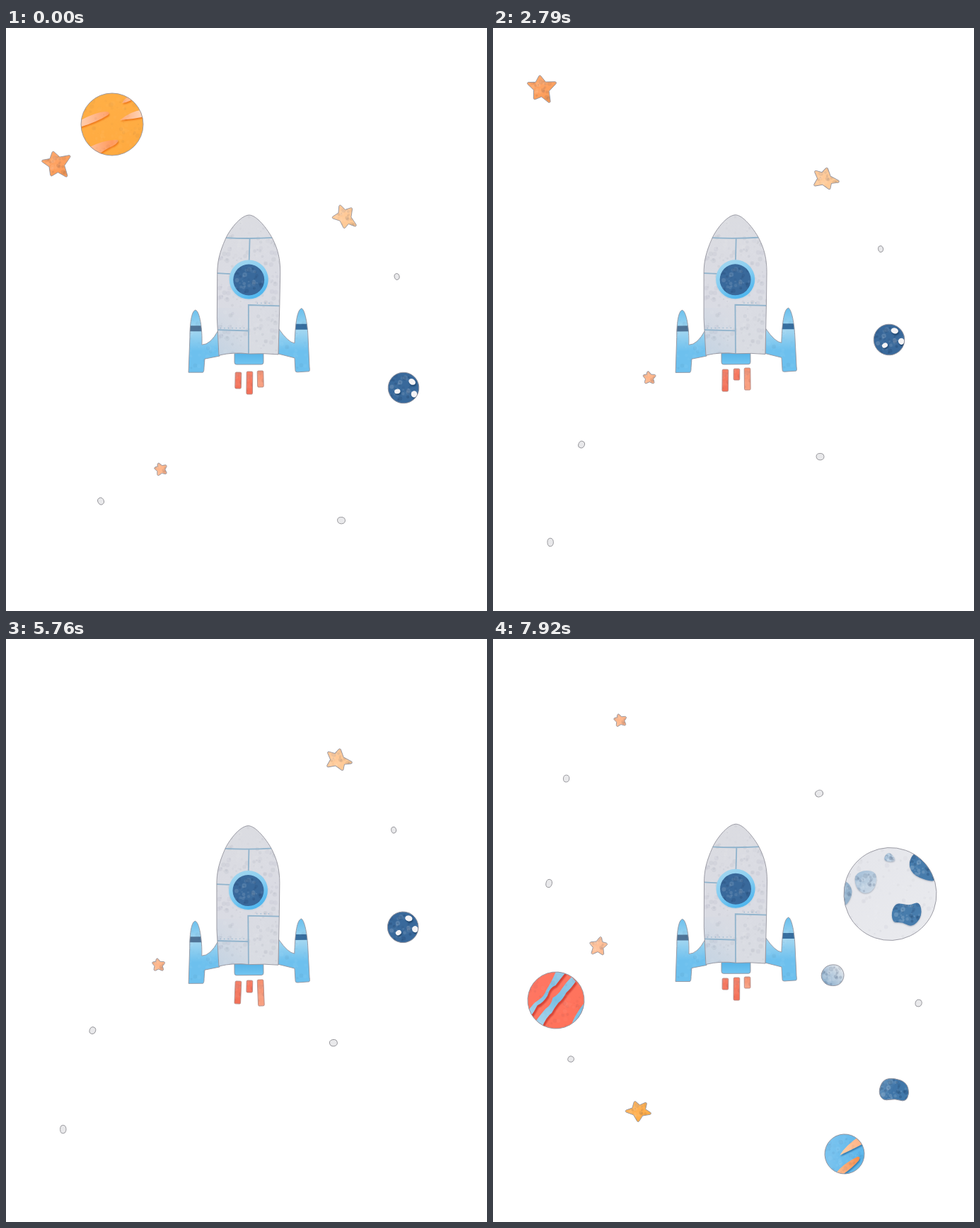
An HTML page with a canvas that plays this animation: 680 by 823 pixels, repeating every 8 s.

```html
<!DOCTYPE html>
<html lang="en">
<head>
<meta charset="utf-8">
<title>Paper rocket</title>
<style>
  html, body { margin: 0; width: 100%; height: 100%; overflow: hidden; background: #fff; }
  canvas { display: block; width: 100vw; height: 100vh; }
</style>
</head>
<body>
<canvas width="680" height="823"></canvas>
<script>
const ctx = document.querySelector('canvas').getContext('2d');
const STEP = 90, CYCLE = 3060, LOOP = 8000;
const DRIFT = 0.47, TOP = 64, BOTTOM = 760;
const TIMES = [0, 450, 810, 1440, 1800, 1980, 2790];
const OUTLINE = '#94949e', DEEP = '#39699b', SKY = '#6dc0ee';

// ---------- drawing helpers ----------
function wash(x0, y0, x1, y1, ...colors) {
  const g = ctx.createLinearGradient(x0, y0, x1, y1);
  colors.forEach((c, i) => g.addColorStop(i / (colors.length - 1), c));
  return g;
}

function disc(r, x = 0, y = 0, ry = r, turn = 0) {
  const p = new Path2D();
  p.ellipse(x, y, r, ry, turn, 0, 7);
  return p;
}

// Smooth closed outline through the midpoints of a polygon
function pebblePath(points) {
  const p = new Path2D(), n = points.length;
  const mid = i => {
    const [a, b] = points[i % n], [c, d] = points[(i + 1) % n];
    return [(a + c) / 2, (b + d) / 2];
  };
  p.moveTo(...mid(0));
  for (let i = 1; i <= n; i++) p.quadraticCurveTo(...points[i % n], ...mid(i));
  p.closePath();
  return p;
}

// Star with slightly blunt tips; valleys sit between neighbouring tips
function starPath(tips) {
  const p = new Path2D(), points = [];
  tips.forEach(([x, y], i) => {
    const [nx, ny] = tips[(i + 1) % 5];
    points.push([x, y], [(x + nx) * 0.31, (y + ny) * 0.31]);
  });
  const last = points[9];
  p.moveTo(last[0], last[1]);
  points.forEach(([x, y], i) => {
    if (i % 2) p.lineTo(x, y);
    else p.arcTo(x, y, ...points[i + 1], 1.7);
  });
  p.closePath();
  return p;
}

// Seeded watercolour grain inside a box of half size r
function grain(r, strength, x = 0, y = 0) {
  let seed = 7;
  const random = () => (seed = seed * 16807 % 2147483647) / 2147483647;
  for (let i = 0; i < 4 + r * 3; i++) {
    ctx.fillStyle = `rgba(${i % 2 ? '255,255,255' : '0,25,60'},${strength * random()})`;
    ctx.fill(disc(1 + random() * 2.5, x + (random() * 2 - 1) * r, y + (random() * 2 - 1) * r));
  }
}

function cutout(path, fill, inside, line = OUTLINE) {
  ctx.fillStyle = fill;
  ctx.fill(path);
  if (inside) {
    ctx.save();
    ctx.clip(path);
    inside();
    ctx.restore();
  }
  if (line) {
    ctx.strokeStyle = line;
    ctx.lineWidth = 0.9;
    ctx.stroke(path);
  }
}

function raised(path, fill, shadow, dx = 1, dy = 2) {
  ctx.save();
  ctx.shadowColor = shadow;
  ctx.shadowBlur = 2;
  ctx.shadowOffsetX = dx;
  ctx.shadowOffsetY = dy;
  ctx.fillStyle = fill;
  ctx.fill(path);
  ctx.restore();
}

// ---------- things in space ----------
const star = (tips, light, dark) => () =>
  cutout(starPath(tips), wash(-10, -12, 8, 14, light, dark), () => grain(14, 0.09));

function orangePlanet() {
  cutout(disc(44), wash(-10, -44, 10, 44, '#ffaf46', '#ffaa40'), () => {
    const band = wash(-40, 0, 40, 0, '#ffc9a8', '#ff9a5c', '#ffd2b4');
    const shade = '#f07c1c';
    for (const d of [
      'M-46 -5Q-22 -18 -8 -18Q-2 -17 -6 -13Q-22 -3 -46 4Z',
      'M11 -6Q26 -19 46 -21L46 -11Q28 -7 11 -6Z',
      'M-34 33Q-10 21 8 22Q10 25 2 30Q-12 36 -20 44Z',
      'M14 -30Q17 -36 24 -40L27 -34Q21 -31 14 -30Z'
    ]) raised(new Path2D(d), band, shade);
    grain(44, 0.04);
  });
}

function redPlanet() {
  cutout(disc(40), wash(-20, -30, 25, 35, '#ff7662', '#ff725a'), () => {
    const stripe = wash(-30, 30, 25, -35, '#a9d5ec', '#79bfe4', '#9acbe4');
    for (const d of [
      'M-43 13Q-34 1 -25 -3Q-16 -7 -11 -17Q-4 -25 6 -42L19 -38Q8 -27 2 -21Q-7 -19 -11 -8Q-18 1 -27 4Q-32 12 -40 20Z',
      'M-36 30Q-24 17 -16 10Q-8 7 -4 -4Q5 -8 10 -15Q17 -23 26 -30L31 -23Q23 -14 16 -9Q9 1 3 4Q-4 11 -8 17Q-17 22 -25 37Z',
      'M17 38Q24 23 42 6L42 40Z'
    ]) raised(new Path2D(d), stripe, '#d64537', 2, 3);
    grain(40, 0.05);
  });
}

function bluePlanet() {
  cutout(disc(28), wash(-20, -5, 25, 12, '#79c3ef', '#5bb5ea'), () => {
    raised(new Path2D('M-7 0Q4 -11 28 -20L30 -8Q10 -3 -7 0Z'), wash(-7, 0, 28, 0, '#ffd0a8', '#ffb183'), '#347fb5');
    raised(new Path2D('M-24 29Q-12 14 17 8Q22 9 17 14Q4 23 -14 29Z'), wash(-20, 20, 20, 10, '#ffc198', '#f78c48'), '#347fb5');
    grain(28, 0.06);
  });
}

function navyPlanet() {
  cutout(disc(21.8), DEEP, () => {
    grain(22, 0.16);
    raised(disc(5.2, 11, -10, 4, 0.5), '#f4f3f5', '#1d4670');
    raised(disc(4.2, -8, 6, 3.3, -0.3), '#f4f3f5', '#1d4670');
    raised(disc(4.3, 16, 7, 4.6), '#f4f3f5', '#1d4670');
  });
}

function moon() {
  cutout(disc(65.5), wash(-40, -50, 40, 60, '#e5e6eb', '#e9eaee'), () => {
    grain(65, 0.04);
    const patch = (points, fill, r, x, y, strength) => {
      raised(pebblePath(points), fill, '#aab0bc', 0, 1);
      ctx.save();
      ctx.clip(pebblePath(points));
      grain(r, strength, x, y);
      ctx.restore();
    };
    const pale = wash(-50, -35, -20, 0, '#9fbcd6', '#d3dde8');
    patch([[-50, -30], [-33, -36], [-17, -31], [-20, -10], [-33, -1], [-47, -8]], pale, 15, -33, -18, 0.15);
    patch([[-72, -24], [-58, -20], [-52, -5], [-62, 13], [-72, 12]], '#94b2cc', 12, -62, -5, 0.12);
    patch([[-8, -49], [1, -61], [12, -47], [2, -45]], wash(-7, -55, 8, -45, '#7fa6ca', '#dce6ef'), 8, 1, -52, 0.15);
    patch([[28, -44], [40, -60], [65, -42], [68, -15], [52, -16], [32, -27]], '#477cac', 20, 48, -36, 0.18);
    patch([[0, 26], [8, 12], [26, 18], [41, 12], [44, 33], [29, 49], [14, 40], [2, 41]], '#477cac', 20, 22, 29, 0.18);
  });
}

function darkRock() {
  const edge = [[-21, -5], [-9, -20], [7, -17], [21, -6], [21, 10], [11, 20], [-1, 11], [-18, 9]];
  cutout(pebblePath(edge), wash(-18, -15, 14, 15, '#6d9ac0', '#3e74a7', '#427aac'), () => grain(20, 0.17));
}

function lightRock() {
  const edge = [[-18, -2], [-7, -16], [12, -14], [18, 2], [8, 16], [-11, 13]];
  cutout(pebblePath(edge), wash(-12, 10, 13, -8, '#8caecb', '#b5cadd', '#dfe5eb'), () => grain(15, 0.15));
}

const pebble = (w, h) => () => cutout(
  pebblePath([[-w, 0], [-w * 0.6, -h], [w * 0.7, -h], [w * 1.1, 0], [w * 0.6, h], [-w * 0.7, h]]),
  '#e9e9eb', null, '#949499');

// Each path starts at TIMES[start] and holds [x, y, degrees] for that and the following times
const bodies = [
  { draw: orangePlanet, r: 44, start: 0, path: [[150, 136, 0], [159, 302, -5], [171, 442, -12]] },
  { draw: redPlanet, r: 40, start: 3, path: [[86, 392, 0], [89, 510, -7], [86, 571, -17]] },
  { draw: bluePlanet, r: 28, start: 1, path: [[510, 105, 0], [506, 264, 2], [502, 571, 12], [497, 727, -14]] },
  { draw: navyPlanet, r: 22, start: 5, path: [[570.5, 141.5, 0], [560, 440, -16], [562, 508, 7], [557, 650, -18]] },
  { draw: moon, r: 65.5, start: 3, path: [[569, 225, 0], [561.5, 360, -3], [557, 429, -6]] },
  { draw: darkRock, r: 18, start: 2, path: [[587, 137, 24], [585.5, 504, 0], [566, 638, -18], [556, 724, -32]] },
  { draw: lightRock, r: 15, start: 3, path: [[475.5, 324, 0], [480, 475, -8], [476.5, 555, -14]] },
  { draw: star([[-4, -19], [23, -13], [18, 20], [-7, 18], [-22, -5]], '#ffa76a', '#fc9c58'), r: 19, start: 6,
    path: [[67, 85, 9], [70, 192, 0], [78, 397, -12], [81, 559, -24]] },
  { draw: star([[-7, -18], [12, -13], [20, 16], [0, 18], [-19, 2]], '#ffc999', '#ffca96'), r: 18, start: 6,
    path: [[468, 213, -28], [478, 266, 0], [480, 438, -18], [476, 555, 26]] },
  { draw: star([[-4, -16], [14, -13], [21, 5], [-1, 16], [-21, -2]], '#ffb45e', '#ffab43'), r: 16, start: 1,
    path: [[202, 90, 18], [201, 229, 6], [202, 517, 0], [205, 667, -4], [211, 737, -5]] },
  { draw: star([[3, -15], [14, -4], [9, 14], [-10, 14], [-14, -4]], '#ffc6a0', '#ffbb92'), r: 14, start: 3,
    path: [[147, 288, 0], [149, 433, 4], [152, 499, 2]] },
  { draw: star([[-4, -11], [10, -6], [9, 8], [-6, 10], [-11, -3]], '#ffbd93', '#ffb184'), r: 10, start: 4,
    path: [[180, 115, 0], [172, 191, 4], [221, 494, 8], [219, 623, -4]] },
  { draw: pebble(5, 5.5), r: 6, start: 3,
    path: [[471, 90, 0], [461, 218, 60], [466, 290, 20], [462.5, 605, 85], [474, 695, 85]] },
  { draw: pebble(4.5, 5.8), r: 6, start: 3, path: [[78.5, 202, 10], [79, 345, 10], [77.5, 421, 0], [81, 726, -5]] },
  { draw: pebble(4.5, 4.2), r: 5, start: 2, path: [[108.5, 162, 0], [107.5, 464, 0], [110, 593, 20], [111.5, 667, 10]] },
  { draw: pebble(4.5, 5), r: 5, start: 4, path: [[103.5, 197, 0], [100.5, 269, 0], [125, 588, 20], [134, 668, -35]] },
  { draw: pebble(3.7, 4.4), r: 5, start: 6, path: [[548, 312, -15], [552.5, 351, -20], [548, 467, -90], [545.5, 600, 10]] },
  { draw: pebble(4.8, 5), r: 5, start: 2, path: [[616, 50, 0], [610.5, 388, 30], [601.5, 514, 10], [588.5, 597, 15]] }
];

function poseAt(body, phase) {
  const { start, path } = body;
  const keys = path.map((_, i) => TIMES[(start + i) % 7] + (start + i >= 7 ? CYCLE : 0));
  const from = keys[0] - 750, last = path.length - 1;
  const t = from + ((phase - from) % CYCLE + CYCLE) % CYCLE;
  const beyond = (i) => [path[i][0], path[i][1] + (t - keys[i]) * DRIFT, path[i][2]];
  if (t <= keys[0]) return beyond(0);
  if (t >= keys[last]) return beyond(last);
  const i = keys.findIndex(k => k > t) - 1;
  const mix = (t - keys[i]) / (keys[i + 1] - keys[i]);
  return path[i].map((v, j) => v + (path[i + 1][j] - v) * mix);
}

function drawBody(body, phase) {
  const [x, y, angle] = poseAt(body, phase);
  if (y - body.r < TOP || y + body.r > BOTTOM) return;
  ctx.save();
  ctx.translate(x, y);
  ctx.rotate(angle * Math.PI / 180);
  body.draw();
  ctx.restore();
}

// ---------- rocket ----------
function drawRocket(phase) {
  const turn = phase / CYCLE * 2 * Math.PI;
  ctx.save();
  ctx.translate(344, 470 - 1.5 + 1.5 * Math.cos(turn));
  ctx.rotate(0.011 * Math.sin(turn - 0.2));
  ctx.translate(-344, -470);

  const fin = (d, x, bandY, band) => cutout(new Path2D(d), wash(0, 396, 0, 486, '#68bfed', '#a4d7f1', SKY, SKY), () => {
    ctx.fillStyle = band;
    ctx.fillRect(x, bandY, 26, 8);
    grain(44, 0.05, x + 18, 445);
  });
  fin('M268 398C262 399 260 420 260 436L258 486H278Q280 486 280 479L281 467L302 463L300 427Q289 447 277 447C278 425 274 399 268 398Z', 255, 420, '#4f7497');
  fin('M418 396C411 398 409 422 408 445Q399 444 386 425L385 460L408 466L409 484Q409 486 412 486L428 485Q430 485 429 479L427 434C426 414 422 397 418 396Z', 405, 418, '#376e9f');
  cutout(new Path2D('M323 459H364V472Q364 475 361 475H326Q323 475 323 472Z'), wash(0, 460, 0, 475, '#59b4e7', '#72c5f1'));

  const hull = new Path2D('M344 264C331 265 316 286 311 297C302 317 299 330 299 347L298.5 410L301 462Q322 457 344 460Q366 459 385 461L387 392L388 345C388 326 385 313 377 297C370 284 355 264 344 264Z');
  cutout(hull, wash(310, 270, 375, 460, '#dbdce1', '#dadbe3', '#d9dce2'), () => {
    ctx.fillStyle = wash(300, 460, 345, 400, 'rgba(176,203,226,.55)', 'rgba(200,214,230,0)');
    ctx.fillRect(298, 395, 45, 70);
    for (let y = 290; y < 460; y += 55) grain(45, 0.05, 344, y);
    ctx.strokeStyle = '#90b3cc';
    ctx.lineWidth = 1.8;
    ctx.stroke(new Path2D('M310 296Q345 298 380 296M345 297L344 328M298 346L318 347M343 460V391L389 392.5M299 426L343 427.5'));
    ctx.setLineDash([1.2, 4.3]);
    ctx.lineWidth = 1.2;
    ctx.stroke(new Path2D('M355 388.5H377M303 423.5H341'));
  });

  raised(disc(27.5, 343.5, 355), wash(325, 330, 350, 382, '#a2d6ef', '#84cdf2', '#4db5ee'), '#b6cfdf', 0, 1);
  const glass = disc(22, 343.5, 355.5);
  cutout(glass, DEEP, () => grain(22, 0.13, 343.5, 355.5), null);
  ctx.restore();
}

function drawFlames(frame) {
  const beat = frame % 34 % 7;
  const outer = [23, 30, 32, 31, 23, 23, 16][beat];
  const inner = [32, 15, 17, 16, 32, 42, 32][beat];
  const top = [486, 481, 483, 482, 485, 486, 479][beat];
  const tilt = [0.02, -0.02, 0.04, 0.01, 0.02, 0.03, 0.01][beat];
  const strip = (x, y, length, light, dark, angle) => {
    ctx.save();
    ctx.translate(x, y);
    ctx.rotate(angle);
    const p = new Path2D();
    p.roundRect(-4.3, 0, 8.6, length, 1.5);
    cutout(p, wash(0, 0, 0, length, light, dark), () => grain(14, 0.06, 0, length / 2), '#b58a84');
    ctx.restore();
  };
  strip(328.5, top, outer, '#f57f66', '#f26f57', tilt);
  strip(344.5, top - 1, inner, '#f98065', '#f36f58', tilt / 2);
  strip(359.5, top - 2, outer + (beat === 2 ? 5 : 0), '#f5906f', '#f8a283', -tilt);
}

// ---------- playback: stop motion, one pose per step ----------
let shown = -1;
function tick() {
  const frame = Math.floor(performance.now() % LOOP / STEP);
  if (frame !== shown) {
    shown = frame;
    const phase = frame * STEP % CYCLE;
    ctx.fillStyle = '#fff';
    ctx.fillRect(0, 0, 680, 823);
    bodies.forEach(body => drawBody(body, phase));
    drawFlames(frame);
    drawRocket(phase);
  }
  requestAnimationFrame(tick);
}
tick();
</script>
</body>
</html>
```
